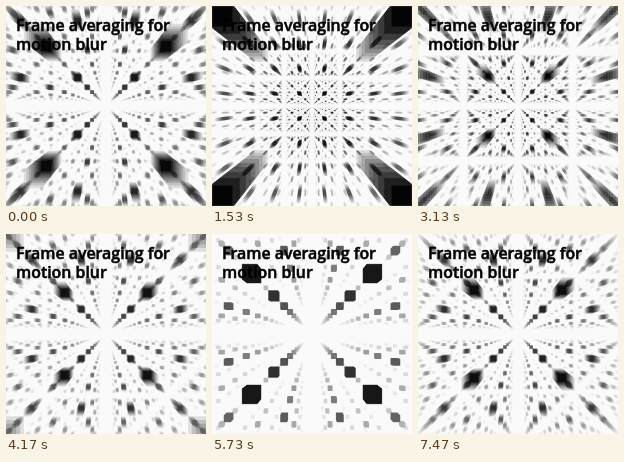
These frames come from a looping animation (200 by 200 pixels, 7.51 s). An HTML page with a canvas:

```html
<!DOCTYPE html>
<html lang="en">
<head>
<meta charset="utf-8">
<title>Motion blur</title>
<style>
  html, body { margin: 0; width: 100%; height: 100%; overflow: hidden; background: #fafafa; }
  canvas, svg { position: absolute; left: 0; top: 0; width: 200px; height: 200px; }
  text { font: 600 15.9px "Open Sans", "Noto Sans", sans-serif; fill: #000; stroke: #000; stroke-width: 0.5px; }
</style>
</head>
<body>
<canvas id="view" width="200" height="200"></canvas>
<svg viewBox="0 0 200 200">
  <text x="10" y="24.7">Frame averaging for</text>
  <text x="10" y="43.5">motion blur</text>
</svg>
<script>
const LOOP = 7510, STEP = 40, SHUTTER = 40, SAMPLES = 9;
const HALF_WIDTH = 11;   // cells from centre to edge in the plane the zoom keeps still
const HALF_CUBE = 0.062, NEAR = 0.03, FAR = 11, PAPER = 250;

// Camera distance to the still plane, in cells: [time, distance]
const keys = [[0, 11.9], [1530, 3.16], [2530, 2.2], [3130, 5.89], [4170, 13.48], [5730, 22.72]];

const view = document.getElementById('view').getContext('2d');
const sceneCanvas = document.createElement('canvas');
sceneCanvas.width = sceneCanvas.height = 200;
const scene = sceneCanvas.getContext('2d');
const grays = Array.from({ length: 256 }, (_, v) => `rgb(${v},${v},${v})`);

function key(i) {
  const n = keys.length, lap = Math.floor(i / n), [time, value] = keys[i - lap * n];
  return [time + lap * LOOP, value];
}

// Smooth periodic curve through the keys.
function distance(time) {
  const t = (time + LOOP) % LOOP;
  let i = 0;
  while (key(i + 1)[0] <= t) i++;
  const [a, b, c, d] = [i - 1, i, i + 1, i + 2].map(key);
  const span = c[0] - b[0], s = (t - b[0]) / span;
  const slopeIn = span * (c[1] - a[1]) / (c[0] - a[0]);
  const slopeOut = span * (d[1] - b[1]) / (d[0] - b[0]);
  const rest = 1 - s;
  return b[1] * rest * rest * (1 + 2 * s) + c[1] * s * s * (3 - 2 * s)
    + slopeIn * s * rest * rest - slopeOut * s * s * rest;
}

// Outline of a cube and its three mirror images.
function drawCube(x, y, front, back) {
  const x0 = x - HALF_CUBE, x1 = x + HALF_CUBE, y0 = y - HALF_CUBE, y1 = y + HALF_CUBE;
  scene.beginPath();
  for (const sx of [-1, 1]) {
    for (const sy of [-1, 1]) {
      const corner = (px, py, scale) => scene.lineTo(100 + sx * px * scale, 100 + sy * py * scale);
      scene.moveTo(100 + sx * x0 * back, 100 + sy * y0 * back);
      corner(x1, y0, back);
      corner(x1, y0, front);
      corner(x1, y1, front);
      corner(x0, y1, front);
      corner(x0, y1, back);
      scene.closePath();
    }
  }
  scene.fill();
}

function drawLayer(z, focal) {
  const front = focal / Math.max(NEAR, z - HALF_CUBE), back = focal / (z + HALF_CUBE);
  const reach = 100 / back + HALF_CUBE;
  for (let x = 0.5; x < reach; x++) {
    for (let y = 0.5; y < reach; y++) {
      const fog = Math.exp(-(x * x + y * y + z * z) / 36);
      if (fog < 0.03) break;
      scene.fillStyle = grays[Math.round(PAPER * (1 - fog))];
      drawCube(x, y, front, back);
    }
  }
}

// Dolly zoom: the focal length grows with the distance.
function drawScene(time) {
  const depth = distance(time), focal = 100 * depth / HALF_WIDTH;
  const offset = depth - Math.floor(depth);
  scene.fillStyle = grays[PAPER];
  scene.fillRect(0, 0, 200, 200);
  for (let k = FAR; k >= 0; k--) {
    if (k + offset > NEAR) drawLayer(k + offset, focal);
  }
}

// Averages several instants spread over the shutter time.
function render(time) {
  for (let i = 0; i < SAMPLES; i++) {
    drawScene(time + SHUTTER * ((i + 0.5) / SAMPLES - 0.5));
    view.globalAlpha = 1 / (i + 1);
    view.drawImage(sceneCanvas, 0, 0);
  }
}

const begin = performance.now();
let shown = -1;

function tick(now) {
  const time = Math.max(0, now - begin) % LOOP;
  const step = Math.max(0, Math.floor((time + 30) / STEP) * STEP - 30);
  if (step !== shown) render(shown = step);
  requestAnimationFrame(tick);
}
tick(begin);
</script>
</body>
</html>
```
